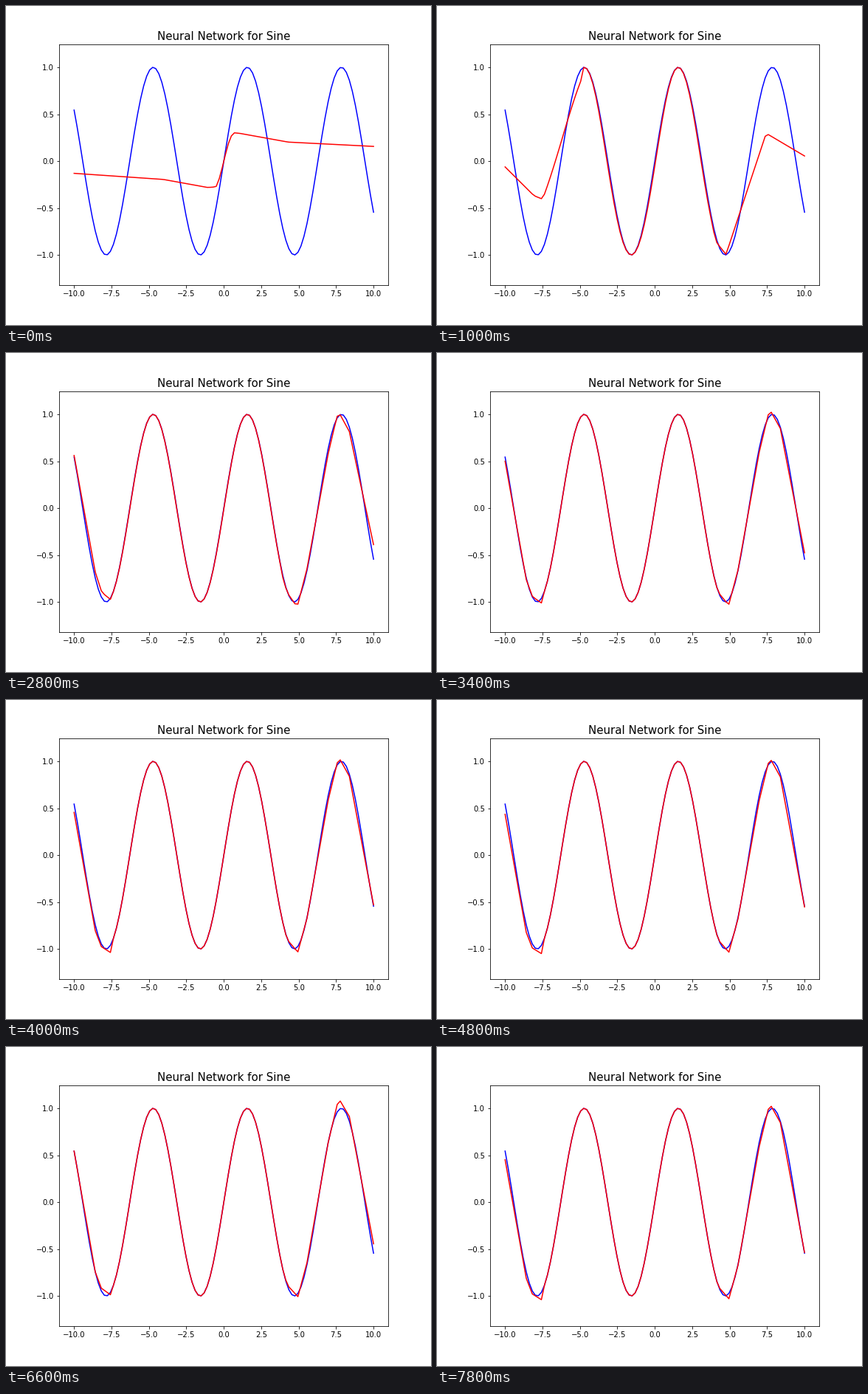
These frames come from a looping animation (576x432 px, 8000 ms). A matplotlib script:

```python
import numpy as np
import matplotlib.pyplot as plt
from matplotlib.animation import FuncAnimation

FRAMES, STEP = 40, 200
WARMUP = 2000   # ms until the whole range is roughly learned
xs = np.linspace(-10, 10, 100)


def curve(left, right, amp=1, freq=1, sag=0):
    """A wave in the middle, straight segments through the outer points."""
    inside = xs[(xs > left[-1][0] + .05) & (xs < right[0][0] - .05)]
    wave = amp * np.sin(freq * inside) - sag * np.cos(inside) ** 2
    lx, ly = zip(*left)
    rx, ry = zip(*right)
    return np.interp(xs, np.r_[lx, inside, rx], np.r_[ly, wave, ry])


# Learning spreads outward from the centre.
untrained = curve([(-10, -.13), (-4.04, -.195), (-1.1, -.28), (-.75, -.278)],
                  [(.71, .302), (1.1, .295), (4.3, .203), (10, .157)],
                  amp=.3, freq=2.2)
half = curve([(-10, -.2), (-7.5, -.3), (-4.9, .85)],
             [(4.2, -.87), (4.75, -.95), (7.4, .2), (10, .1)], sag=.05)
rough = curve([(-10, .63), (-8.18, -.74), (-7.98, -.84), (-7.58, -.915)],
              [(3.94, -.83), (4.75, -1.205), (4.95, -1.085),
               (7.37, .645), (7.58, .735), (10, -.17)], sag=.05)

# Bends of the trained fit: place and distance from the sine.
LEFT = [(-10, 0), (-8.586, 0), (-8.182, .03), (-7.576, -.025)]
RIGHT = [(4.141, .01), (4.343, .03), (4.949, -.035), (5.556, .02), (6.97, 0),
         (7.576, .08), (7.778, .08), (8.384, .05), (10, .1)]


def trained(t):
    """The ends sink and rise slowly, most where they are far out."""
    swing = .11 * abs(np.sin(np.pi * (t - 2800) / 3800))

    def bend(x, err):
        return x, np.sin(x) + err - swing * (x / 10) ** 2

    return curve([bend(*p) for p in LEFT], [bend(*p) for p in RIGHT])


def mix(a, b, k):
    return a + (b - a) * k


def fit(t):
    if t < 800:
        return mix(untrained, half, t / 800)
    if t < WARMUP:
        return mix(half, rough, (t - 800) / (WARMUP - 800))
    return mix(trained(t), rough, np.exp((WARMUP - t) / 500))


plt.rcParams.update({"font.family": "DejaVu Sans", "font.size": 10})
fig, ax = plt.subplots(figsize=(8, 6), dpi=72)
fig.subplots_adjust(left=.125, right=.9, bottom=.125, top=.88)
ax.set_title("Neural Network for Sine", fontsize=15)
ax.set_xlim(-11, 11)
ax.set_ylim(-1.3212, 1.2452)
ax.plot(xs, np.sin(xs), color="blue", lw=1.5)
line, = ax.plot(xs, untrained, color="red", lw=1.5)


def draw(n):
    line.set_ydata(fit(n * STEP))
    return line,


anim = FuncAnimation(fig, draw, frames=FRAMES, interval=STEP,
                     repeat=True, repeat_delay=0)
plt.show()
```
